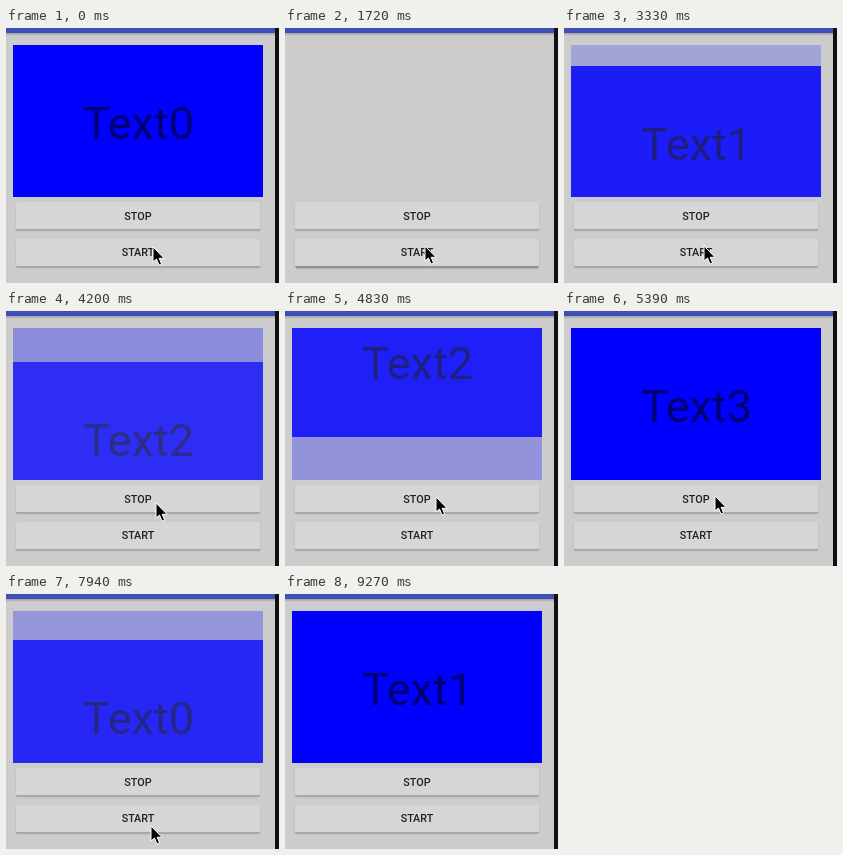
Animation, 273 px wide and 255 px high, one loop 9.37 s. Source, as an HTML page:

```html
<!DOCTYPE html>
<html lang="en">
<head>
<meta charset="utf-8">
<title>Text switcher</title>
<style>
  html, body { margin: 0; width: 100%; height: 100%; overflow: hidden; background: #ccc; }
  svg { display: block; }
  text { font-family: Roboto, sans-serif; text-anchor: middle; }
  .card text { font-size: 45px; fill: #000; fill-opacity: .54; }
  .label { font-size: 10.8px; font-weight: 500; fill: #202020; }
</style>
</head>
<body>
<svg width="273" height="255" viewBox="0 0 273 255">
  <defs>
    <clipPath id="window"><rect x="7" y="17" width="250" height="152"/></clipPath>
    <linearGradient id="fade" x2="0" y2="1">
      <stop stop-color="#000" stop-opacity=".22"/>
      <stop offset="1" stop-color="#000" stop-opacity="0"/>
    </linearGradient>
    <g id="button">
      <rect x="9.5" y="1" width="245" height="28.4" rx="2" fill="#000" fill-opacity=".08"/>
      <rect x="10" y="1" width="244" height="27.4" rx="2" fill="#000" fill-opacity=".2"/>
      <rect x="10" width="244" height="27.3" rx="1.5" fill="#d5d7d6"/>
    </g>
  </defs>
  <rect width="273" height="255" fill="#ccc"/>
  <rect width="269" height="5" fill="#3f4fb5"/>
  <rect y="5" width="269" height="3" fill="url(#fade)"/>
  <rect x="269" width="4" height="255" fill="#0d1113"/>

  <g clip-path="url(#window)">
    <g class="card" id="leaving"><rect x="7" y="17" width="250" height="152" fill="#00f"/><text x="132.5" y="111"></text></g>
    <g class="card" id="current"><rect x="7" y="17" width="250" height="152" fill="#00f"/><text x="132.5" y="111"></text></g>
  </g>

  <use href="#button" y="174"/>
  <rect id="press" x="11" y="238" width="242" height="4" fill="url(#fade)"/>
  <use href="#button" y="211"/>
  <text class="label" x="132" y="192">STOP</text>
  <text class="label" x="132" y="228">START</text>
  <path id="cursor" d="M0 1V16L3.5 13L6 19L8.6 18L6.1 12.3H11Z" stroke="#fff"/>
</svg>
<script>
const LOOP = 9370, PERIOD = 933, SLIDE = 920, HEIGHT = 152, TEXTS = 5;
const $ = id => document.getElementById(id);
const clamp = x => Math.max(0, Math.min(1, x));
const ease = x => (1 - Math.cos(Math.PI * clamp(x))) / 2;

// Each press on START clears the card, then slides in a run of new ones
const runs = [
  { clear: 1703, start: 1703, first: 0, count: 4 },
  { clear: 6280, start: 6352, first: 4, count: 3 }
];

// Pointer moves: [begin, end, x, y]
const moves = [
  [80, 510, 140, 217], [3640, 4150, 150, 191], [4600, 4900, 151, 184],
  [5390, 5770, 131, 225], [7200, 7940, 145, 231], [8000, 8400, 152, 258]
];

function pointerAt(t) {
  let x = 147, y = 218;
  for (const [begin, end, toX, toY] of moves) {
    const k = ease((t - begin) / (end - begin));
    x += (toX - x) * k;
    y += (toY - y) * k;
  }
  return [Math.round(x), Math.round(y)];
}

function place(id, number, shift, alpha) {
  const card = $(id);
  card.lastChild.textContent = "Text" + number % TEXTS;
  card.setAttribute("transform", `translate(0 ${Math.round(shift)})`);
  card.setAttribute("opacity", alpha);
}

function drawCards(t) {
  const run = runs.findLast(r => t >= r.clear) || { start: -LOOP, first: 0, count: 1 };
  const since = Math.max(0, t - run.start);
  const step = Math.min(run.count - 1, Math.floor(since / PERIOD));
  const p = ease((since - step * PERIOD) / SLIDE);
  const number = run.first + step;

  place("leaving", number + TEXTS - 1, -HEIGHT * p, step ? 1 - p ** 1.5 : 0);
  place("current", number, HEIGHT * (1 - p), p);
}

function draw() {
  const t = performance.now() % LOOP;
  const pressed = runs.some(r => t > r.clear - 220 && t < r.clear + 60);
  drawCards(t);
  $("press").setAttribute("opacity", pressed ? 1 : 0);
  $("cursor").setAttribute("transform", `translate(${pointerAt(t)})`);
  requestAnimationFrame(draw);
}
draw();
</script>
</body>
</html>
```
